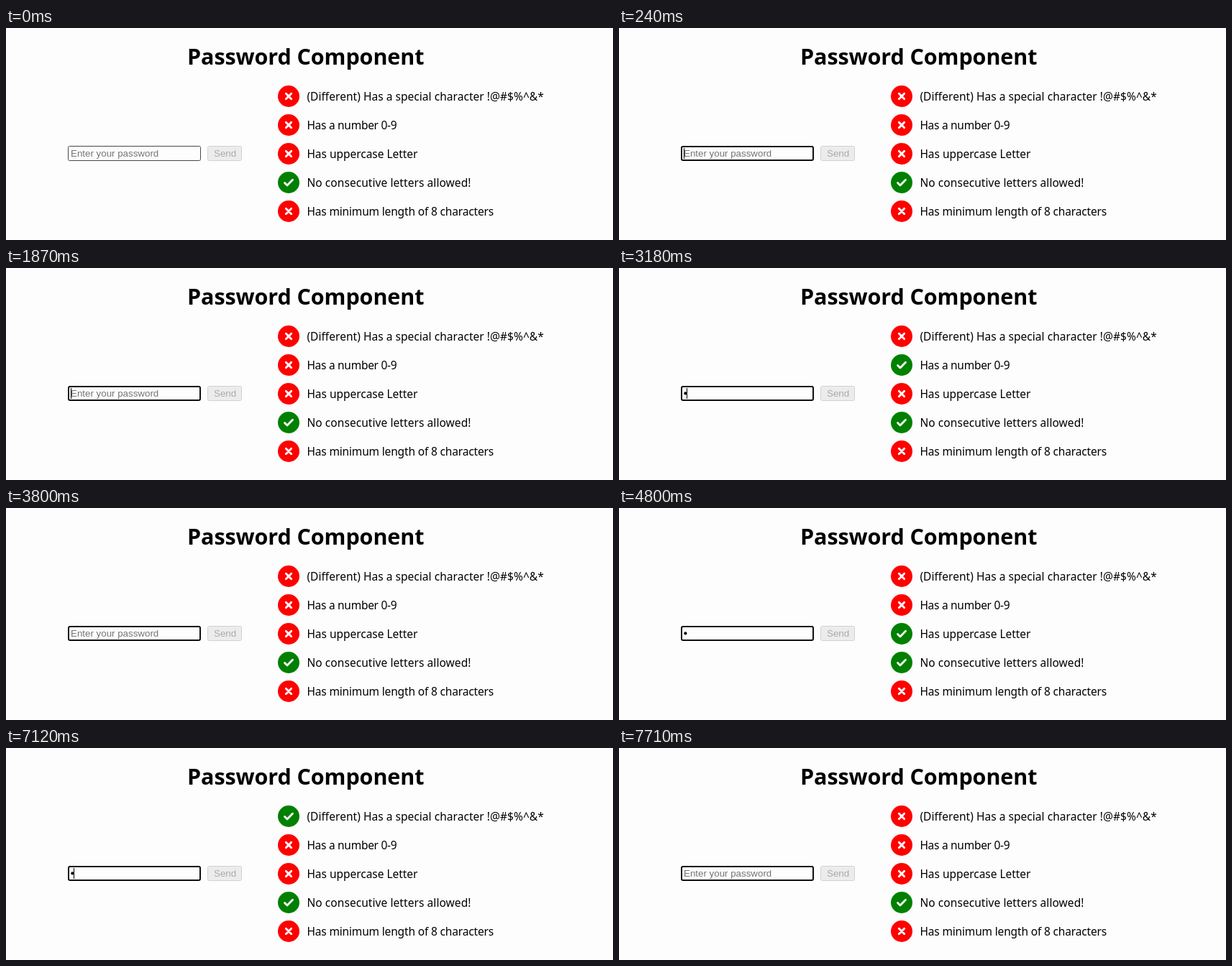
An HTML page that plays this animation: 844x295 px, repeating every 8000 ms.

```html
<!DOCTYPE html>
<html lang="en">
<head>
<meta charset="utf-8">
<title>Password Component</title>
<style>
  html, body { margin: 0; width: 100%; height: 100%; overflow: hidden; background: #fdfdfd; }
  svg { display: block; width: 844px; height: 295px; }
  text { font-family: "Noto Sans", "Open Sans", sans-serif; white-space: pre; }
  .title { font-size: 30.5px; font-weight: 700; letter-spacing: -.1px; }
  .rule { font-size: 15.5px; }
  .control { font: 13.333px "Liberation Sans", Arial, sans-serif; }
  .mark { fill: none; stroke: #fff; stroke-width: 2.8; stroke-linecap: round; stroke-linejoin: round; }
</style>
</head>
<body>
<svg viewBox="0 0 844 295">
  <text class="title" x="252" y="51">Password Component</text>
  <rect id="field" fill="#fdfdfd"/>
  <text id="hint" class="control" x="90" y="179" fill="#757575">Enter your password</text>
  <circle id="dot" cx="92.4" cy="174.4" r="2.1"/>
  <rect id="caret" y="167" width="1" height="15"/>
  <rect x="280.5" y="164.5" width="47" height="20" rx="2" fill="#ececec" stroke="#d2d2d2"/>
  <text class="control" x="289" y="179" fill="#aaa">Send</text>
  <g id="rules"></g>
</svg>
<script>
const LOOP = 8000;
const $ = id => document.getElementById(id);
const set = (el, attrs) => {
  for (const k in attrs) el.setAttribute(k, attrs[k]);
  return el;
};
const add = (parent, tag, attrs) =>
  parent.appendChild(set(document.createElementNS("http://www.w3.org/2000/svg", tag), attrs));
const within = (t, spans) => spans.some(([from, to]) => t >= from && t < to);
const show = (id, on) => set($(id), { visibility: on ? "visible" : "hidden" });

const FOCUS = 240;
const typed = [[2010, 3650], [4200, 5190], [5910, 7400]];
const caretOn = [[240, 840], [1420, 2580], [3180, 3800], [4200, 4800], [5410, 6510], [7120, 7710]];

// label, letter spacing, times when the rule is met
const rules = [
  ["(Different) Has a special character !@#$%^&*", .04, [[5950, 7400]]],
  ["Has a number 0-9", -.28, [[2010, 3680]]],
  ["Has uppercase Letter", -.03, [[4240, 5220]]],
  ["No consecutive letters allowed!", .07, [[0, LOOP]]],
  ["Has minimum length of 8 characters", -.16, []]
].map(([label, spacing, met], i) => {
  const y = 95 + 40 * i;
  const disc = add($("rules"), "circle", { cx: 393, cy: y, r: 15 });
  const mark = add($("rules"), "path", { class: "mark", transform: `translate(393 ${y})` });
  add($("rules"), "text", { class: "rule", x: 418.4, y: y + 6, "letter-spacing": spacing }).textContent = label;
  return { disc, mark, met };
});

function draw(t) {
  const filled = within(t, typed);
  set($("field"), t >= FOCUS
    ? { x: 87, y: 165, width: 183, height: 19, rx: 2, stroke: "#101010", "stroke-width": 2 }
    : { x: 86.5, y: 164.5, width: 184, height: 20, rx: 2, stroke: "#484848", "stroke-width": 1 });
  show("hint", !filled);
  show("dot", filled);
  show("caret", within(t, caretOn));
  set($("caret"), { x: filled ? 94 : 90 });
  for (const { disc, mark, met } of rules) {
    const ok = within(t, met);
    set(disc, { fill: ok ? "#008000" : "#f00" });
    set(mark, { d: ok ? "M-5.5 .5L-2 4L5.5 -3.8" : "M-3.7 -3.7L3.7 3.7M3.7 -3.7L-3.7 3.7" });
  }
}

const start = performance.now();
function tick() {
  draw((performance.now() - start) % LOOP);
  requestAnimationFrame(tick);
}
tick();
</script>
</body>
</html>
```
